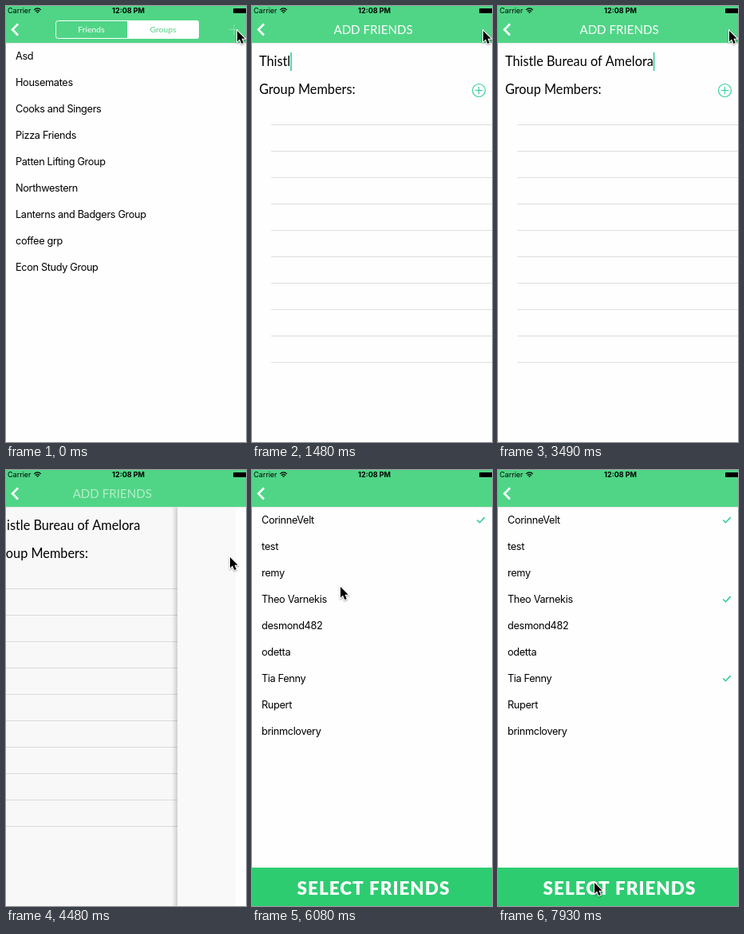
These frames come from a looping animation (301x545 px, 7990 ms). An HTML page with a canvas:

```html
<!DOCTYPE html>
<html lang="en">
<head>
<meta charset="utf-8">
<title>Group creation</title>
<style>
html, body { margin: 0; width: 100%; height: 100%; overflow: hidden; background: #fefefe; }
canvas { display: block; }
</style>
</head>
<body>
<canvas id="stage" width="301" height="545"></canvas>
<script>
const W = 301, H = 545, LOOP = 7990, BAR = 46;
const NAV = '#50d586', ACCENT = '#2ecc9b', PAPER = '#fefefe';
const SANS = 'Inter, sans-serif', ROUND = 'Lato, sans-serif';
const ctx = document.getElementById('stage').getContext('2d');

const groups = ['Asd', 'Housemates', 'Cooks and Singers', 'Pizza Friends', 'Patten Lifting Group',
  'Northwestern', 'Lanterns and Badgers Group', 'coffee grp', 'Econ Study Group'];
const friends = ['CorinneVelt', 'test', 'remy', 'Theo Varnekis', 'desmond482', 'odetta',
  'Tia Fenny', 'Rupert', 'brinmclovery'];

const groupName = 'Thistle Bureau of Amelora';
// Typing bursts: [first key, last key, number of keys]
const bursts = [[940, 940, 1], [1120, 1590, 7], [1770, 2540, 10], [2900, 2900, 1], [3140, 3450, 6]];
const checks = [[0, 5720], [3, 6560], [6, 7220]]; // [row, time]
const LIST_SHOWN = 4830, BUTTON_SHOWN = 5720;

// Pointer positions: [time, x, y]
const pointer = [[0, 289, 30], [3600, 289, 30], [3900, 285, 82], [4060, 280, 108], [4800, 280, 108],
  [5060, 183, 110], [5300, 130, 76], [5480, 118, 62], [5780, 118, 62], [5930, 115, 104],
  [6080, 110, 145], [6260, 101, 159], [6440, 97, 162], [6740, 97, 162], [6900, 91, 215],
  [7060, 88, 258], [7300, 89, 264], [7520, 101, 339], [7720, 112, 445], [7930, 120, 515]];

const clamp = v => Math.max(0, Math.min(1, v));
const push = (t, start) => {
  const u = clamp((t - start) / 540);
  return u * u * (3 - 2 * u);
};

function text(str, x, y, size, family, { color = '#000', weight = 400, align = 'left', spacing = 0 } = {}) {
  ctx.font = `${weight} ${size}px ${family}`;
  ctx.letterSpacing = spacing + 'px';
  ctx.textAlign = align;
  ctx.fillStyle = color;
  ctx.fillText(str, x, y);
}

function rect(x, y, w, h, color) {
  ctx.fillStyle = color;
  ctx.fillRect(x, y, w, h);
}

function stroke(path, color, width) {
  ctx.strokeStyle = color;
  ctx.lineWidth = width;
  ctx.stroke(new Path2D(path));
}

function list(names) {
  names.forEach((name, i) => text(name, 12, 67 + 33 * i, 12.75, SANS, { spacing: -0.36 }));
}

function typed(t) {
  let n = 0;
  for (const [from, to, count] of bursts) {
    if (t >= from) n += count < 2 ? 1 : Math.min(count, 1 + Math.floor((t - from) / (to - from) * (count - 1)));
  }
  return groupName.slice(0, n);
}

function groupsView() {
  rect(0, 0, W, H, PAPER);
  list(groups);
}

function formView(t) {
  rect(0, 0, W, H, PAPER);
  const name = typed(t);
  text(name, 9, 75, 16.3, ROUND);
  if (t > 700 && t < 4100) rect(9 + ctx.measureText(name).width, 58, 1.6, 23, ACCENT);
  text('Group Members:', 9, 110, 16.3, ROUND);
  stroke('M276.5 105.5a8 8 0 1 0 16 0a8 8 0 1 0 -16 0M280 105.5h9M284.5 101v9', ACCENT, 1.1);
  for (let i = 0; i < 10; i++) rect(24, 148 + 33 * i, W - 24, 1, '#dedee0');
}

function friendsView(t, x) {
  rect(0, 0, W, H, PAPER);
  // Faint strip that lingers after the slide
  if (t < 5300) {
    const left = t < 4540 ? 0 : Math.max(0, 252 - x);
    const top = t < LIST_SHOWN ? BAR : 334;
    rect(left, top, Math.max(0, 288 - x - left), H - top, '#f9f9f9');
  }
  if (t < LIST_SHOWN) return;
  list(friends);
  for (const [row, at] of checks) {
    if (t >= at) {
      const y = 62.5 + 33 * row;
      stroke(`M282.3 ${y}l3.2 3.2l6.2 -6.6`, ACCENT, 1.6);
    }
  }
  if (t >= BUTTON_SHOWN) {
    rect(0, 497, W, 48, '#2ecc71');
    text('SELECT FRIENDS', 152.5, 531, 22.5, ROUND, { color: '#fff', weight: 900, align: 'center', spacing: 1 });
  }
}

function shifted(x, draw) {
  ctx.save();
  ctx.translate(x, 0);
  draw();
  ctx.restore();
}

function slide(p, below, above) {
  if (p < 1) {
    shifted(-0.31 * W * p, below);
    rect(0, 0, W, H, `rgba(0,0,0,${0.08 * p})`);
  }
  if (p > 0) {
    const x = Math.round(W * (1 - p));
    if (p < 1) {
      const shade = ctx.createLinearGradient(x - 7, 0, x, 0);
      shade.addColorStop(0, 'rgba(0,0,0,0)');
      shade.addColorStop(1, 'rgba(0,0,0,.17)');
      rect(x - 7, 0, 7, H, shade);
    }
    shifted(x, () => above(x));
  }
}

function segments() {
  ctx.beginPath();
  ctx.roundRect(62.5, 18.5, 179, 22, 3);
  ctx.strokeStyle = '#fff';
  ctx.lineWidth = 1;
  ctx.stroke();
  ctx.beginPath();
  ctx.roundRect(152, 18, 90, 23, [0, 3, 3, 0]);
  ctx.fillStyle = '#fff';
  ctx.fill();
  text('Friends', 107, 33, 10.4, ROUND, { color: '#fff', align: 'center' });
  text('Groups', 197, 33, 10.4, ROUND, { color: NAV, align: 'center' });
  stroke('M279.5 29.5h13M286 23v13', 'rgba(255,255,255,.3)', 1);
}

function navBar(p1, p2) {
  rect(0, 0, W, BAR, NAV);
  rect(0, BAR, W, 1, '#dfe6e1');
  ctx.globalAlpha = clamp(1 - 1.5 * p1);
  if (p1 < 1) shifted(-66 * p1, segments);
  ctx.globalAlpha = p1 * clamp(1 - 1.5 * p2);
  text('ADD FRIENDS', 152 + 140 * (1 - p1) - 66 * p2, 34.5, 15.1, ROUND, { color: '#fff', align: 'center' });
  ctx.globalAlpha = 1;
  stroke('M15 22.5L8 29.5L15 36.5', '#fff', 2.5);

  text('Carrier', 2, 9, 9, SANS);
  text('12:08 PM', 153.5, 9, 9, SANS, { weight: 700, align: 'center' });
  stroke('M35.2 4.9Q39.5 .9 43.8 4.9M36.8 6.7Q39.5 4.1 42.2 6.7', '#000', 1.2);
  ctx.fillStyle = '#000';
  ctx.fill(new Path2D('M38 7.6Q39.5 6.5 41 7.6L39.5 9.2Z'));
  ctx.beginPath();
  ctx.roundRect(285, 3, 20, 6, 1);
  ctx.fill();
}

function cursor(t) {
  let i = pointer.findIndex(k => k[0] > t);
  if (i < 0) i = pointer.length - 1;
  const [t0, x0, y0] = pointer[i - 1], [t1, x1, y1] = pointer[i];
  const u = clamp((t - t0) / (t1 - t0));
  ctx.save();
  ctx.translate(x0 + (x1 - x0) * u + 1, y0 + (y1 - y0) * u + 1);
  const arrow = new Path2D('M0 0V13.5L3.1 10.6L5.4 16L7.8 15L5.5 9.7H9.7Z');
  ctx.shadowColor = 'rgba(0,0,0,.4)';
  ctx.shadowBlur = 2;
  ctx.shadowOffsetY = 1;
  ctx.strokeStyle = '#fff';
  ctx.lineWidth = 2;
  ctx.stroke(arrow);
  ctx.shadowColor = 'transparent';
  ctx.fillStyle = '#000';
  ctx.fill(arrow);
  ctx.restore();
}

function draw() {
  const t = performance.now() % LOOP;
  const p1 = push(t, 190), p2 = push(t, 4291);
  if (p1 < 1) slide(p1, groupsView, () => formView(t));
  else slide(p2, () => formView(t), x => friendsView(t, x));
  navBar(p1, p2);
  cursor(t);
  requestAnimationFrame(draw);
}
draw();
</script>
</body>
</html>
```
